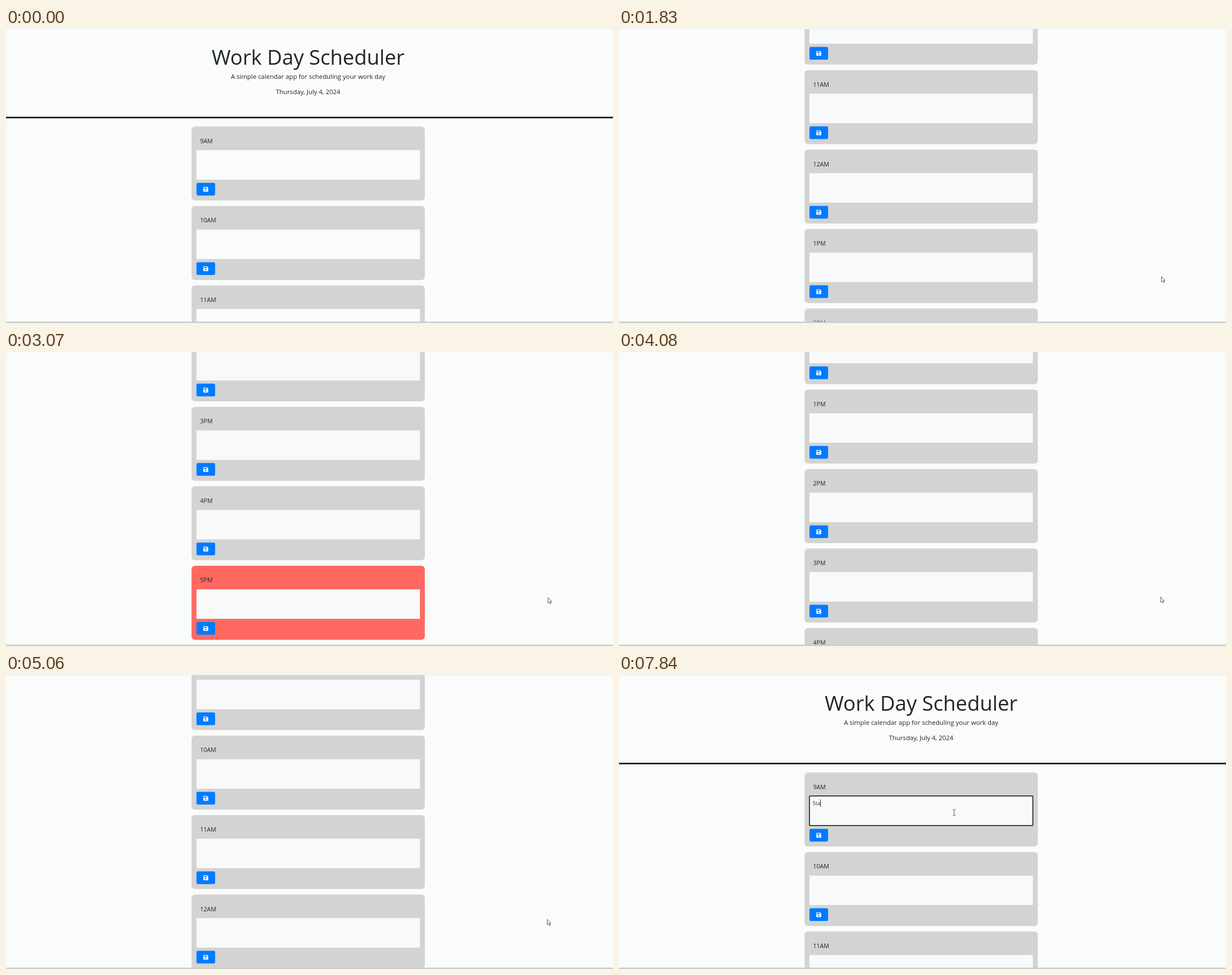
Animation of 1074x522 px, one loop 8000 ms. Source, as an HTML page:

```html
<!DOCTYPE html>
<html lang="en">
<head>
<meta charset="utf-8">
<title>Work Day Scheduler</title>
<style>
  html, body { margin: 0; height: 100%; overflow: hidden; background: #fafcfb; }
  svg { display: block; width: 1074px; height: 522px; }
  text { font: 11.33px "Open Sans", sans-serif; fill: #212529; }
  .mid { text-anchor: middle; }
  .title { font-size: 36.3px; }
  .hour { font-size: 10.5px; font-weight: 500; }
  .note { font-size: 9.44px; fill: #333; }
</style>
</head>
<body>
<svg viewBox="0 0 1074 522">
  <defs>
    <g id="save">
      <rect width="33" height="22.5" rx="2.8" fill="#007bff"/>
      <path d="M13 7.2h5.8l2 2v5.8q0 .8-.8.8h-7q-.8 0-.8-.8v-7q0-.8.8-.8Z" fill="#fff"/>
      <path d="M13.5 8.4h4.7v2.2h-4.7Z" fill="#007bff"/>
      <circle cx="16.5" cy="13.2" r="1.2" fill="#007bff"/>
    </g>
  </defs>
  <g id="page">
    <text class="mid title" x="534.5" y="65">Work Day Scheduler</text>
    <text class="mid" x="534.5" y="90">A simple calendar app for scheduling your work day</text>
    <text class="mid" x="534.5" y="116.5">Thursday, July 4, 2024</text>
    <rect y="157" width="1074" height="2.8" fill="#1f2122"/>
    <g id="cards"></g>
    <rect id="focus" x="337" y="215.8" width="395.3" height="52.4" rx="1.5" fill="none" stroke="#111" stroke-width="1.5"/>
    <text id="note" class="note" x="342.6" y="232"></text>
    <rect id="caret" y="222" width="1" height="13" fill="#333"/>
  </g>
  <rect width="1074" height="2" fill="#fdfefe"/>
  <rect y="1" width="1074" height="1" fill="#e6e8e8"/>
  <rect y="519.5" width="1074" height="2.5" fill="#cbcecf"/>
  <path id="arrow" d="M0 0V9.8L2.3 7.8 3.9 11 5.3 10.4 3.8 7.2H6.6Z" fill="#fff" stroke="#333" stroke-width=".8"/>
  <path id="beam" d="M-2.5-5H-.6L0-4.4.6-5H2.5M0-4.4V4.4M-2.5 5H-.6L0 4.4.6 5H2.5" fill="none" stroke="#444" stroke-width=".9"/>
</svg>
<script>
const LOOP = 8000;
const $ = id => document.getElementById(id);
const show = (el, on) => el.setAttribute('visibility', on ? 'visible' : 'hidden');
const move = (el, x, y) => el.setAttribute('transform', `translate(${x} ${y})`);

const hours = ['9AM', '10AM', '11AM', '12AM', '1PM', '2PM', '3PM', '4PM', '5PM'];
$('cards').innerHTML = hours.map((hour, i) => `
  <g transform="translate(328.3 ${174.3 + i * 140.6})">
    <rect width="412.7" height="131" rx="6" fill="${hour === '5PM' ? '#ff6961' : '#d3d3d3'}"/>
    <text class="hour" x="15.3" y="29.5">${hour}</text>
    <rect class="field" x="8.7" y="41.8" width="395.3" height="52.2"/>
    <use href="#save" x="8.7" y="99.6"/>
  </g>`).join('');
const fields = $('cards').querySelectorAll('.field');

// Bursts of screen updates: start, end, number of updates
const bursts = [[580, 820, 4], [990, 3070, 28], [3770, 4840, 15], [4990, 5760, 12], [5830, 5900, 2]];
// Time, scroll offset
const scrollKeys = [
  [930, 0], [990, 30], [1144, 126], [1450, 285], [1760, 340], [2250, 600], [2454, 626],
  [2540, 645], [2850, 870], [3070, 919.2], [3700, 919.2], [3770, 900], [4050, 690],
  [4300, 480], [4500, 330], [4611, 303.6], [4840, 282], [4940, 282], [4990, 265],
  [5150, 130], [5350, 20], [5500, 0]
];
// Time, pointer x, pointer y
const pointerKeys = [
  [580, 1036, 512], [820, 961, 443.5], [1300, 961, 443.5], [2300, 959, 436.3],
  [3770, 959, 436.3], [4300, 957.7, 434], [5250, 957.7, 434], [5760, 597, 246], [5900, 593, 245]
];
// Time, typed text, caret position
const typing = [[0, '', 343], [7370, 'S', 347.2], [7570, 'St', 351], [7840, 'Sta', 356]];

function snap(t) {
  let shown = 0;
  for (const [from, to, count] of bursts) {
    if (t < from) break;
    const step = (to - from) / (count - 1);
    shown = Math.min(to, from + Math.floor((t - from) / step + .2) * step);
  }
  return shown;
}

function at(keys, t) {
  const next = keys.findIndex(key => key[0] > t);
  if (next < 0) return keys[keys.length - 1].slice(1);
  if (next === 0) return keys[0].slice(1);
  const a = keys[next - 1], b = keys[next];
  const p = (t - a[0]) / (b[0] - a[0]);
  return a.slice(1).map((v, i) => v + (b[i + 1] - v) * p);
}

function draw(t) {
  const shown = snap(t);
  const [scroll] = at(scrollKeys, shown);
  const [x, y] = at(pointerKeys, shown);
  move($('page'), 0, -scroll);
  for (const field of fields) field.setAttribute('fill', t < 990 ? '#fafcfb' : '#f8f9fb');

  const overField = x < 732 && y < 268;
  show($('arrow'), t >= 580 && !overField);
  show($('beam'), overField);
  move($('arrow'), x, y);
  move($('beam'), x, y);

  const [, text, caretX] = typing.filter(key => key[0] <= t).pop();
  show($('focus'), t >= 6040);
  $('note').textContent = text;
  $('caret').setAttribute('x', caretX);
  show($('caret'), t >= 6040 && !(t >= 6560 && t < 7040));
}

const start = performance.now();
function tick() {
  draw((performance.now() - start) % LOOP);
  requestAnimationFrame(tick);
}
tick();
</script>
</body>
</html>
```
